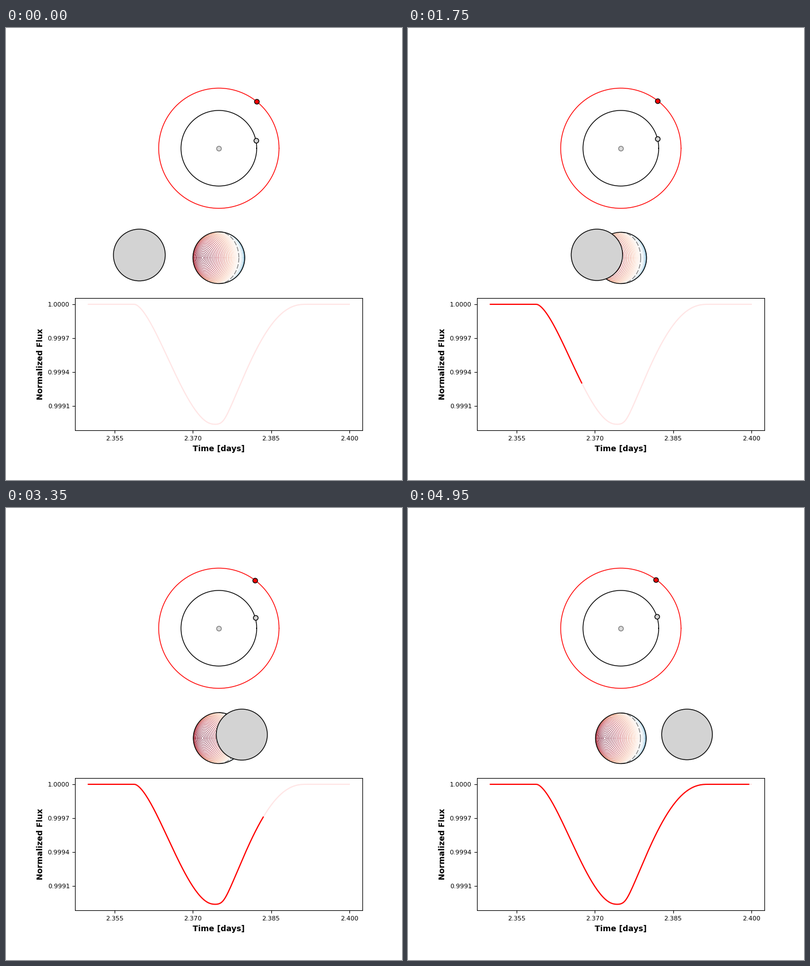
Recreate the animation shown at these times as a matplotlib script. Size 700 by 800 pixels, loop 5 s.

```python
import numpy as np
import matplotlib.pyplot as plt
from matplotlib.animation import FuncAnimation
from matplotlib.collections import LineCollection
from matplotlib.patches import Circle

W, H, DPI = 700, 800, 100
FRAMES, INTERVAL = 100, 50
CX, ORBIT_Y = 376.25, 212.8
R_IN, R_OUT = 66.9, 106.35
DEPTH = 0.0010605
LAG = 0.45                         # the curve trails the discs, in frames
HOT_X = 0.635                      # hot spot offset from disc centre, in radii
HOT_Z = np.sqrt(1 - HOT_X ** 2)

plt.rcParams["font.family"] = "DejaVu Sans"


def discs(i):
    """Occultor centre, occulted centre and shared radius in pixels."""
    gap = 4.8 + 2.0 * i / 99
    r = (96.4 - gap) / 2
    front = 235.7 + 2.918 * i - 0.0032 * i ** 2, 356 + r
    back = CX, 452.4 - r
    return front, back, r


def light_curve(steps):
    """Flux while the front disc covers a half-lit sphere."""
    n = 400
    g = (np.arange(n) + 0.5) / n * 2 - 1
    x, y = np.meshgrid(g, g)
    z2 = 1 - x ** 2 - y ** 2
    lit = np.where(z2 > 0, -HOT_X * x + HOT_Z * np.sqrt(np.maximum(z2, 0)), 0)
    lit = np.maximum(lit, 0)
    loss = []
    for i in steps:
        (fx, fy), (bx, by), r = discs(i)
        dist = np.hypot(x - (fx - bx) / r, y - (fy - by) / r)
        cover = np.clip((1 - dist) * n / 2 + 0.5, 0, 1)
        loss.append((lit * cover).sum())
    loss = np.array(loss)
    return 1 - DEPTH * loss / loss.max()


def zenith_arc(theta):
    """Visible half-arc of constant zenith angle on the unit disc."""
    end = np.arccos(np.clip(-HOT_Z / (HOT_X * np.tan(theta)), -1, 1))
    phi = np.linspace(0, end, 60)
    x = -HOT_X * np.cos(theta) + HOT_Z * np.sin(theta) * np.cos(phi)
    return np.column_stack([x, np.sin(theta) * np.sin(phi)])


def sphere_lines(count=51):
    cmap = plt.get_cmap("RdBu_r")
    arcs, colors = [], []
    for theta in np.pi * np.arange(1, count) / count:
        arc = zenith_arc(theta)
        if np.ptp(arc[:, 1]) < 1e-6:
            continue
        for side in (1, -1):
            arcs.append(arc * [1, side])
            colors.append(cmap((1 + np.cos(theta)) / 2))
    return arcs, colors


fig = plt.figure(figsize=(W / DPI, H / DPI), dpi=DPI, facecolor="white")

# Light curve panel
ax = fig.add_axes([0.175, 0.11, 0.725, 0.292])
steps = np.linspace(0, FRAMES, 2 * FRAMES + 1)
time = 2.35 + 0.05 * steps / FRAMES
flux = light_curve(steps - LAG)
ax.plot(time, flux, color="red", alpha=0.1, lw=1.5)
trace, = ax.plot([], [], color="red", lw=1.5)
ax.set_xlim(2.3475, 2.4025)
ax.set_ylim(1 - 1.05 * DEPTH, 1 + 0.05 * DEPTH)
xticks = [2.355, 2.370, 2.385, 2.400]
yticks = [0.9991, 0.9994, 0.9997, 1.0]
ax.set_xticks(xticks, [f"{v:.3f}" for v in xticks])
ax.set_yticks(yticks, [f"{v:.4f}" for v in yticks])
ax.tick_params(labelsize=8)
ax.set_xlabel("Time [days]", fontsize=10, fontweight="bold", labelpad=4.5)
ax.set_ylabel("Normalized Flux", fontsize=10, fontweight="bold")

# Sky and orbits, in pixel coordinates
sky = fig.add_axes([0, 0, 1, 1])
sky.set_xlim(0, W)
sky.set_ylim(H, 0)
sky.axis("off")

turn = np.linspace(0, 2 * np.pi, 1000)
for radius, color in ((R_IN, "black"), (R_OUT, "red")):
    sky.plot(CX + radius * np.cos(turn), ORBIT_Y - radius * np.sin(turn),
             color=color, lw=1)


def dot(face, edge="black"):
    return sky.plot([CX], [ORBIT_Y], "o", ms=6, mfc=face, mec=edge, mew=1)[0]


dot("#dadada", "#808080")
inner = dot("lightgrey")
outer = dot("red")

unit_arcs, arc_colors = sphere_lines()
# Both halves of the day-night line run from a pole to the equator.
half_rim = zenith_arc(np.pi / 2)[::-1]
half_rims = [half_rim, half_rim * [1, -1]]

back = sky.add_patch(Circle((0, 0), 1, fc="white", ec="none", zorder=3))
arcs = sky.add_collection(
    LineCollection([], colors=arc_colors, linewidths=0.5,
                   capstyle="projecting", zorder=4), autolim=False)
terminator = [sky.plot([], [], color="#808080", lw=1, dashes=(5.8, 2.2),
                       zorder=5)[0] for _ in half_rims]
outline = sky.add_patch(Circle((0, 0), 1, fc="none", ec="black", lw=1, zorder=6))
front = sky.add_patch(Circle((0, 0), 1, fc="lightgrey", ec="black", lw=1, zorder=7))


def place(marker, radius, degrees):
    a = np.radians(degrees)
    marker.set_data([CX + radius * np.cos(a)], [ORBIT_Y - radius * np.sin(a)])


def update(i):
    front_pos, back_pos, r = discs(i)
    for patch, pos in ((back, back_pos), (outline, back_pos), (front, front_pos)):
        patch.set_center(pos)
        patch.set_radius(r)
    arcs.set_segments([a * r + back_pos for a in unit_arcs])
    for line, half in zip(terminator, half_rims):
        line.set_data(*(half * r + back_pos).T)
    place(inner, R_IN, 11.9 + 0.0636 * i)
    place(outer, R_OUT, 51.07 + 0.0318 * i)
    shown = 2 * i + 1
    trace.set_data(time[:shown], flux[:shown])
    return back, arcs, *terminator, outline, front, inner, outer, trace


anim = FuncAnimation(fig, update, frames=FRAMES, interval=INTERVAL,
                     repeat=True, repeat_delay=0, blit=False)
plt.show()
```
